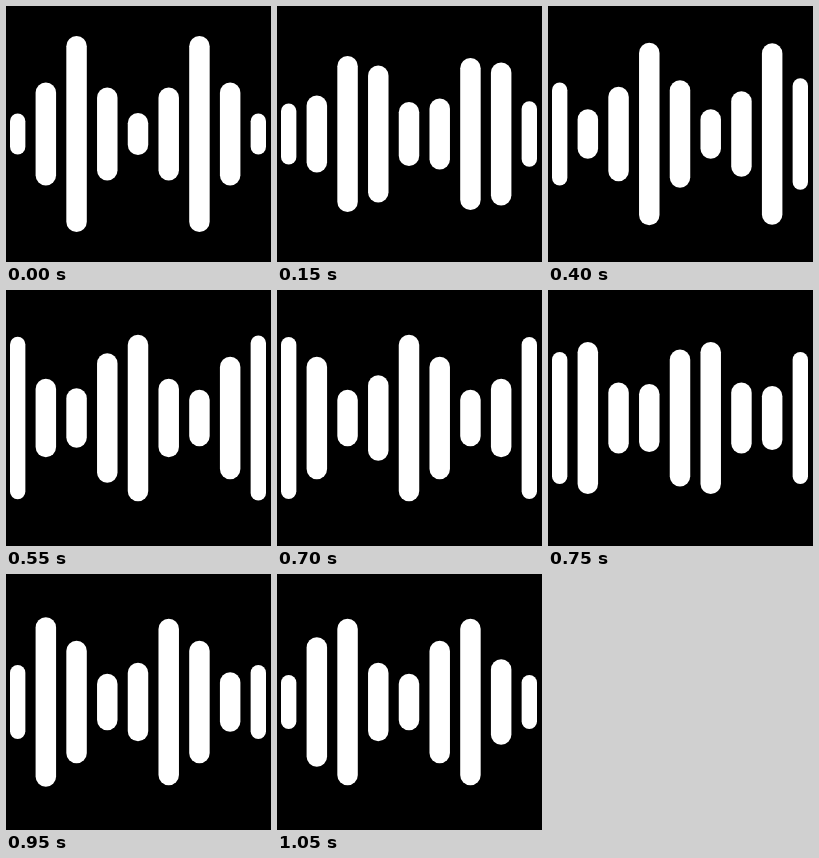
An HTML page without scripts that plays this animation: 265 by 256 pixels, repeating every 1.1 s.

```html
<!DOCTYPE html>
<html lang="en">
<head>
<meta charset="utf-8">
<title>Sound bars</title>
<style>
  html, body { margin: 0; width: 100%; height: 100%; overflow: hidden; background: #000; }
  svg { display: block; width: 265px; height: 256px; }

  /* --a to --d: bar length in the four poses */
  rect {
    width: 20.48px;
    rx: 10.24px;
    fill: #fff;
    animation: wave 1100ms -1ms infinite;
  }
  .edge { width: 15.36px; rx: 7.68px; }

  /* Seven even steps at first, then sevenths shown five at a time */
  @keyframes wave {
    0% {
      height: var(--a); y: calc(128px - var(--a) / 2);
      animation-timing-function: steps(7);
    }
    31.8182% {
      height: var(--b); y: calc(128px - var(--b) / 2);
      animation-timing-function: steps(7);
      animation-timing-function: linear(0 0% 20%, .1429 20% 40%, .2857 40% 60%, .5714 60% 80%, .7143 80% 100%, 1 100%);
    }
    54.5455% {
      height: var(--c); y: calc(128px - var(--c) / 2);
      animation-timing-function: steps(7);
      animation-timing-function: linear(0 0% 20%, .1429 20% 40%, .2857 40% 60%, .5714 60% 80%, .7143 80% 100%, 1 100%);
    }
    77.2727% {
      height: var(--d); y: calc(128px - var(--d) / 2);
      animation-timing-function: steps(7);
      animation-timing-function: linear(0 0% 20%, .1429 20% 40%, .2857 40% 60%, .5714 60% 80%, .7143 80% 100%, 1 100%);
    }
    100% { height: var(--a); y: calc(128px - var(--a) / 2); }
  }
</style>
</head>
<body>
<svg viewBox="0 0 265 256" aria-hidden="true">
  <rect class="edge" x="4" style="--a:41px; --b:88px; --c:192px; --d:87px"/>
  <rect x="29.6" style="--a:103px; --b:42px; --c:93px; --d:196px"/>
  <rect x="60.32" style="--a:196px; --b:103px; --c:42px; --d:93px"/>
  <rect x="91.04" style="--a:93px; --b:196px; --c:103px; --d:42px"/>
  <rect x="121.76" style="--a:42px; --b:93px; --c:196px; --d:93px"/>
  <rect x="152.48" style="--a:93px; --b:42px; --c:93px; --d:196px"/>
  <rect x="183.2" style="--a:196px; --b:93px; --c:42px; --d:93px"/>
  <rect x="213.92" style="--a:103px; --b:196px; --c:93px; --d:42px"/>
  <rect class="edge" x="244.64" style="--a:41px; --b:98px; --c:192px; --d:87px"/>
</svg>
</body>
</html>
```
